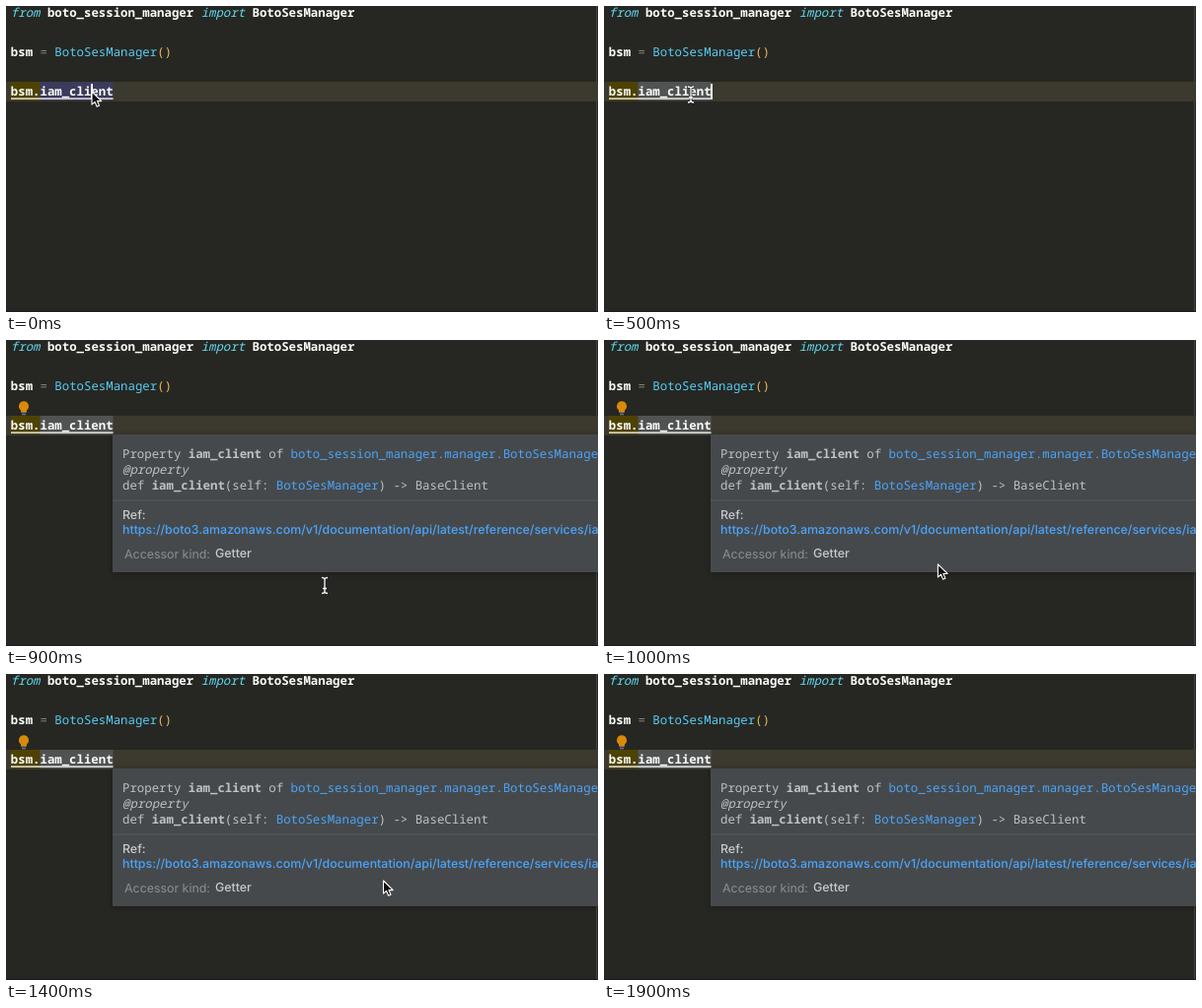
These frames come from a looping animation (600x311 px, 2 s). An HTML page:

```html
<!DOCTYPE html>
<html lang="en">
<head>
<meta charset="utf-8">
<title>Editor quick documentation</title>
<style>
  html, body { margin: 0; width: 100%; height: 100%; overflow: hidden; background: #262722; }
  svg { display: block; width: 100vw; height: 100vh; }
  text { white-space: pre; text-rendering: geometricPrecision; }
  .code { font: 600 12.36px "Noto Sans Mono", "DejaVu Sans Mono", monospace; fill: #fcfcf8; }
  .doc { font: 12.36px "Noto Sans Mono", "DejaVu Sans Mono", monospace; fill: #bfc1c3; }
  .ui { font: 500 12.4px Inter, "Liberation Sans", sans-serif; fill: #c8cacc; }
  .kw { fill: #62d8f0; font-style: italic; font-weight: 500; }
  .cls { fill: #58ccf5; font-weight: 500; }
  .op { fill: #88847f; font-weight: 400; }
  .par { fill: #e8b75e; font-weight: 500; }
  .b { font-weight: 700; }
  .i { font-style: italic; }
  .link { fill: #4ba4fa; }
  .dim { fill: #8c8f91; font-weight: 400; }
</style>
</head>
<body>
<svg viewBox="0 0 600 311" preserveAspectRatio="none">
  <defs>
    <filter id="soft" x="-10%" y="-20%" width="120%" height="140%"><feGaussianBlur stdDeviation="3"/></filter>
  </defs>
  <rect width="600" height="311" fill="#262722"/>
  <rect x="598" width="1" height="311" fill="#42433e"/>
  <rect y="310" width="600" height="1" fill="#1d181a"/>
  <rect y="77" width="600" height="20" fill="#3c3a2e"/>
  <rect x="5" y="77" width="29.5" height="19" fill="#4e4203"/>
  <rect id="sel" x="34.5" y="77" width="74" height="19"/>

  <text class="code" x="4.8" y="11.2"><tspan class="kw">from</tspan> boto_session_manager <tspan class="kw">import</tspan> BotoSesManager</text>
  <text class="code" x="4.8" y="51">bsm <tspan class="op">=</tspan> <tspan class="cls">BotoSesManager</tspan><tspan class="par">()</tspan></text>
  <text class="code" x="4.8" y="91">bsm.iam_client</text>
  <rect x="5" y="93.5" width="103.6" height="1.3" fill="#fcfcf8"/>
  <rect id="caret" y="79" width="2" height="16" fill="#fff"/>

  <g id="popup">
    <rect x="108" y="97" width="520" height="140" fill="#000" opacity=".3" filter="url(#soft)"/>
    <rect x="108" y="96" width="520" height="140" fill="#46494b"/>
    <text class="doc" x="118" y="119.6">Property <tspan class="b">iam_client</tspan> of <tspan class="link">boto_session_manager.manager.BotoSesManager</tspan></text>
    <text class="doc i" x="118" y="135.6">@property</text>
    <text class="doc" x="118" y="151.6">def <tspan class="b">iam_client</tspan>(self: <tspan class="link">BotoSesManager</tspan>) -&gt; BaseClient</text>
    <rect x="108" y="162.5" width="492" height="1" fill="#575b5d"/>
    <text class="ui" x="118" y="182">Ref:</text>
    <text class="ui link" x="118" y="197">https://boto3.amazonaws.com/v1/documentation/api/latest/reference/services/iam.html</text>
    <text class="ui dim" x="120" y="221.5">Accessor kind:</text>
    <text class="ui" x="212" y="221">Getter</text>
    <path d="M18 62.3a5 5 0 0 1 3 9v2h-6v-2a5 5 0 0 1 3-9z" fill="#d98a08"/>
    <path d="M15.5 73.7h5M16 75.7h4" stroke="#8c8b86" stroke-width="1.1"/>
  </g>

  <path id="arrow" d="M0 0v13.2l3.1-2.8 2 4.9 2.4-1-2-4.7h4.2z" fill="#111" stroke="#fff" stroke-width="1.1" stroke-linejoin="round"/>
  <g id="beam" fill="none">
    <path d="M-3-8Q0-8 0-6V6Q0 8-3 8M3-8Q0-8 0-6M0 6Q0 8 3 8M-2 3h4" stroke="#222" stroke-width="2.6"/>
    <path d="M-3-8Q0-8 0-6V6Q0 8-3 8M3-8Q0-8 0-6M0 6Q0 8 3 8M-2 3h4" stroke="#fff" stroke-width="1.3"/>
  </g>
</svg>
<script>
  const LOOP = 2000, STEP = 100, SELECT = 300, POPUP = 600, LEAVE = 1900;
  const $ = id => document.getElementById(id);
  const show = (id, on) => $(id).setAttribute("visibility", on ? "visible" : "hidden");

  // Pointer stops: time, x, y
  const stops = [
    [0, 87, 87], [300, 88, 90], [500, 88, 90], [600, 88, 87],
    [900, 323, 249.5], [1200, 382.5, 166], [1400, 382.5, 210],
    [1600, 383, 212], [1800, 493, 278], [LOOP, 493, 278]
  ];

  function pointer(t) {
    const n = stops.findIndex(s => s[0] > t);
    const [t0, x0, y0] = stops[n - 1], [t1, x1, y1] = stops[n];
    const u = (t - t0) / (t1 - t0), k = u * u * (3 - 2 * u);
    return [x0 + (x1 - x0) * k, y0 + (y1 - y0) * k];
  }

  function draw(time) {
    const t = Math.floor((time % LOOP) / STEP) * STEP;
    const open = t >= POPUP, selected = t >= SELECT;
    const [x, y] = pointer(t);
    const isArrow = open ? y < 236 : !selected;

    $("sel").setAttribute("fill", selected ? "#505253" : "#3b3b5c");
    $("caret").setAttribute("x", selected ? 108 : 86);
    show("caret", !open);
    show("popup", open);
    show("arrow", t < LEAVE && isArrow);
    show("beam", t < LEAVE && !isArrow);
    for (const id of ["arrow", "beam"]) $(id).setAttribute("transform", `translate(${x} ${y})`);
  }

  const start = performance.now();
  function tick() {
    draw(performance.now() - start);
    requestAnimationFrame(tick);
  }
  tick();
</script>
</body>
</html>
```
